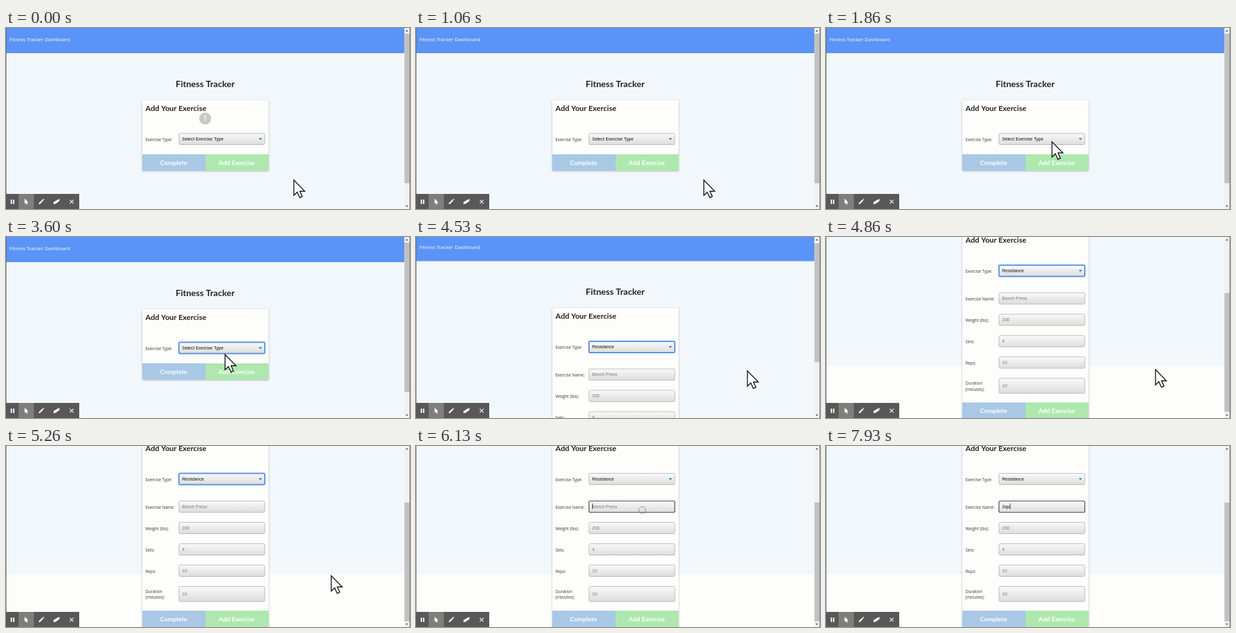
These frames come from a looping animation (640x288 px, 8 s). An HTML page with a canvas:

```html
<!DOCTYPE html>
<html lang="en">
<head>
<meta charset="utf-8">
<title>Fitness Tracker</title>
<style>
  html, body { margin: 0; width: 100%; height: 100%; overflow: hidden; }
  canvas { display: block; width: 640px; height: 288px; }
</style>
</head>
<body>
<canvas id="stage"></canvas>
<script>
const LOOP = 8000, W = 640, H = 288;
const canvas = document.getElementById('stage');
const ctx = canvas.getContext('2d');
const ratio = window.devicePixelRatio || 1;
canvas.width = W * ratio;
canvas.height = H * ratio;

const LATO = 'Lato, sans-serif', OPEN = '"Open Sans", sans-serif';
const ARIAL = '"Liberation Sans", Arial, sans-serif';

const FOCUS_SELECT = 2480, FORM_OPENS = 3850, FOCUS_NAME = 6020;
const SCROLL = { start: 4506, end: 4884, distance: 124 };
const KEYS = [[7000, 'S'], [7350, 'q'], [7750, 'u']];
const CLICKS = [[FOCUS_SELECT, 347, 184], [FOCUS_NAME, 358.5, 102]];
const POINTER_HIDES = 5650;
const POINTER_PATH = [
  [1400, 456, 242], [1800, 358, 181], [2200, 358, 181], [2450, 347, 187],
  [3780, 347, 187], [4200, 525, 213], [4540, 525, 213], [4860, 522, 211],
  [5200, 522, 211], [5700, 358, 102]
];
const POINTER = new Path2D('M0 0V24.3L5.4 19.2L9.4 28L13.4 26.2L9.6 17.7H17.3Z');

// Rows of the resistance form: label lines, placeholder, top, height
const ROWS = [
  [['Exercise Name:'], 'Bench Press', 211, 19],
  [['Weight (lbs):'], '200', 245, 19],
  [['Sets:'], '4', 279, 19],
  [['Reps:'], '10', 313, 19],
  [['Duration', '(minutes):'], '10', 347, 25]
];

const ease = (t, a, b) => {
  const p = Math.min(1, Math.max(0, (t - a) / (b - a)));
  return p * p * (3 - 2 * p);
};

function rect(x, y, w, h, color) {
  ctx.fillStyle = color;
  ctx.fillRect(x, y, w, h);
}

function roundRect(x, y, w, h, r) {
  ctx.beginPath();
  ctx.roundRect(x, y, w, h, r);
}

function polygon(color, ...points) {
  ctx.beginPath();
  points.forEach(([x, y]) => ctx.lineTo(x, y));
  ctx.fillStyle = color;
  ctx.fill();
}

function text(str, x, y, font, color, align = 'left') {
  ctx.font = font;
  ctx.fillStyle = color;
  ctx.textAlign = align;
  ctx.fillText(str, x, y);
}

function box(y, h, ring) {
  const fill = ctx.createLinearGradient(0, y, 0, y + h);
  fill.addColorStop(0, '#fafafa');
  fill.addColorStop(1, '#dcdcdc');
  roundRect(274, y + 0.5, 136, h - 1, 2);
  ctx.fillStyle = fill;
  ctx.fill();
  ctx.lineWidth = ring ? ring.width : 0.8;
  ctx.strokeStyle = ring ? ring.color : '#adadad';
  ctx.stroke();
}

function label(lines, middle) {
  lines.forEach((line, i) => {
    const y = middle + 2.5 + (i - (lines.length - 1) / 2) * 9.8;
    text(line, 221, y, '6.5px ' + OPEN, '#333');
  });
}

function nameField(t, placeholder, baseline) {
  const typed = KEYS.filter(([at]) => t >= at);
  const value = typed.map(([, key]) => key).join('');
  text(value || placeholder, 279, baseline, '7px ' + ARIAL, value ? '#111' : '#777');
  if (t < FOCUS_NAME) return;
  const lastInput = typed.length ? typed[typed.length - 1][0] : FOCUS_NAME;
  if ((t - lastInput) % 1000 < 500) {
    rect(279 + ctx.measureText(value).width, baseline - 7, 0.8, 9, '#111');
  }
}

function form(t, open) {
  const bottom = open ? 412 : 227;
  const buttonTop = bottom - 26;

  ctx.save();
  ctx.shadowColor = 'rgba(0,0,0,.3)';
  ctx.shadowBlur = 3 * ratio;
  ctx.shadowOffsetY = 0.7 * ratio;
  roundRect(216, 114.5, 200, bottom - 114.5, 1.5);
  ctx.fillStyle = '#fdfdfb';
  ctx.fill();
  ctx.restore();

  text('Add Your Exercise', 221, 132, 'bold 12px ' + LATO, '#222');
  label(['Exercise Type:'], 177);
  const focused = t >= FOCUS_SELECT && t < FOCUS_NAME;
  box(167, 19, focused && { width: 1.9, color: '#5590e4' });
  text(open ? 'Resistance' : 'Select Exercise Type', 279, 179, '7px ' + ARIAL, '#111');
  polygon('#1686b8', [400.3, 175.3], [405.7, 175.3], [403, 178.3]);

  if (open) {
    ROWS.forEach(([lines, placeholder, top, height], i) => {
      const middle = top + height / 2;
      label(lines, middle + 0.5);
      box(top, height, i === 0 && t >= FOCUS_NAME && { width: 1.2, color: '#444' });
      if (i === 0) nameField(t, placeholder, middle + 2);
      else text(placeholder, 279, middle + 2, '7px ' + ARIAL, '#777');
    });
  }

  rect(216, buttonTop, 100, 26, '#a8c8e6');
  rect(316, buttonTop, 100, 26, '#aee8ae');
  text('Complete', 265.5, buttonTop + 16.5, 'bold 10px ' + LATO, '#fff', 'center');
  text('Add Exercise', 365.5, buttonTop + 16.5, 'bold 10px ' + LATO, '#fff', 'center');
}

function page(t, open, scroll) {
  ctx.save();
  ctx.translate(0, -scroll);
  rect(0, 0, W, 328, '#f2f7fc');
  rect(0, 328, W, 120, '#fdfdfb');
  rect(0, 0, W, 40, '#5b94f8');
  text('Fitness Tracker Dashboard', 5.3, 20.7, '7.8px ' + OPEN, '#fff');
  text('Fitness Tracker', 315.5, 94, 'bold 14px ' + LATO, '#222', 'center');
  form(t, open);
  ctx.restore();
}

function scrollbar(open, scroll) {
  rect(631, 0, 9, H, '#f1f1f1');
  rect(631.3, 9 + scroll * 0.653, 7.7, open ? 189 : 238, '#c1c1c1');
  polygon('#505050', [633, 5.5], [637, 5.5], [635, 3]);
  polygon('#505050', [633, 282.5], [637, 282.5], [635, 285]);
  rect(0, 0, 0.7, H, '#666');
  rect(639.3, 0, 0.7, H, '#666');
}

function toolbar() {
  rect(0, 264, 116, 24, '#585858');
  rect(20, 264, 24, 24, '#7e7e7a');
  rect(7.5, 273, 2, 7, '#fff');
  rect(11.2, 273, 2, 7, '#fff');
  polygon('#fff', [29.5, 271.5], [29.5, 280], [31.5, 278.3], [33, 281.3],
    [34.4, 280.6], [33, 277.7], [35.5, 277.5]);
  polygon('#fff', [51.8, 280.4], [52.3, 278.2], [57.6, 272.9], [59.3, 274.6], [54, 279.9]);
  polygon('#fff', [58.2, 272.3], [59.1, 271.5], [60.7, 273.1], [59.9, 274]);
  polygon('#fff', [75.3, 277], [81, 273.4], [85, 272], [84.5, 275.4], [79, 279.6], [75.3, 280.5]);
  ctx.beginPath();
  ctx.moveTo(101, 273.3); ctx.lineTo(107, 279.3);
  ctx.moveTo(107, 273.3); ctx.lineTo(101, 279.3);
  ctx.strokeStyle = '#fff';
  ctx.lineWidth = 1.2;
  ctx.stroke();
}

function countdown(t) {
  ctx.globalAlpha = 1 - ease(t, 60, 600);
  ctx.beginPath();
  ctx.arc(315.5, 144, 9.5, 0, Math.PI * 2);
  ctx.fillStyle = '#c8c8c6';
  ctx.fill();
  text('1', 315.5, 148.3, '12px ' + OPEN, '#fff', 'center');
  ctx.globalAlpha = 1;
}

function clickRings(t) {
  for (const [at, x, y] of CLICKS) {
    if (t < at || t > at + 300) continue;
    ctx.globalAlpha = 1 - ease(t, at + 120, at + 300);
    ctx.beginPath();
    ctx.arc(x, y, 5.5, 0, Math.PI * 2);
    ctx.strokeStyle = '#d96a6a';
    ctx.lineWidth = 0.9;
    ctx.stroke();
    ctx.globalAlpha = 1;
  }
}

function pointer(t) {
  if (t >= POINTER_HIDES) return;
  let [, x, y] = POINTER_PATH[0];
  for (let i = 1; i < POINTER_PATH.length; i++) {
    const [t0, x0, y0] = POINTER_PATH[i - 1];
    const [t1, x1, y1] = POINTER_PATH[i];
    if (t < t0) break;
    const p = ease(t, t0, t1);
    x = x0 + (x1 - x0) * p;
    y = y0 + (y1 - y0) * p;
  }
  ctx.save();
  ctx.translate(x, y);
  ctx.fillStyle = '#fff';
  ctx.fill(POINTER);
  ctx.strokeStyle = '#111';
  ctx.lineWidth = 1.4;
  ctx.stroke(POINTER);
  ctx.restore();
}

function draw(t) {
  const open = t >= FORM_OPENS;
  const scroll = SCROLL.distance * ease(t, SCROLL.start, SCROLL.end);
  ctx.setTransform(ratio, 0, 0, ratio, 0, 0);
  page(t, open, scroll);
  scrollbar(open, scroll);
  toolbar();
  countdown(t);
  clickRings(t);
  pointer(t);
}

const start = performance.now();
function tick() {
  draw((performance.now() - start) % LOOP);
  requestAnimationFrame(tick);
}
tick();
</script>
</body>
</html>
```
